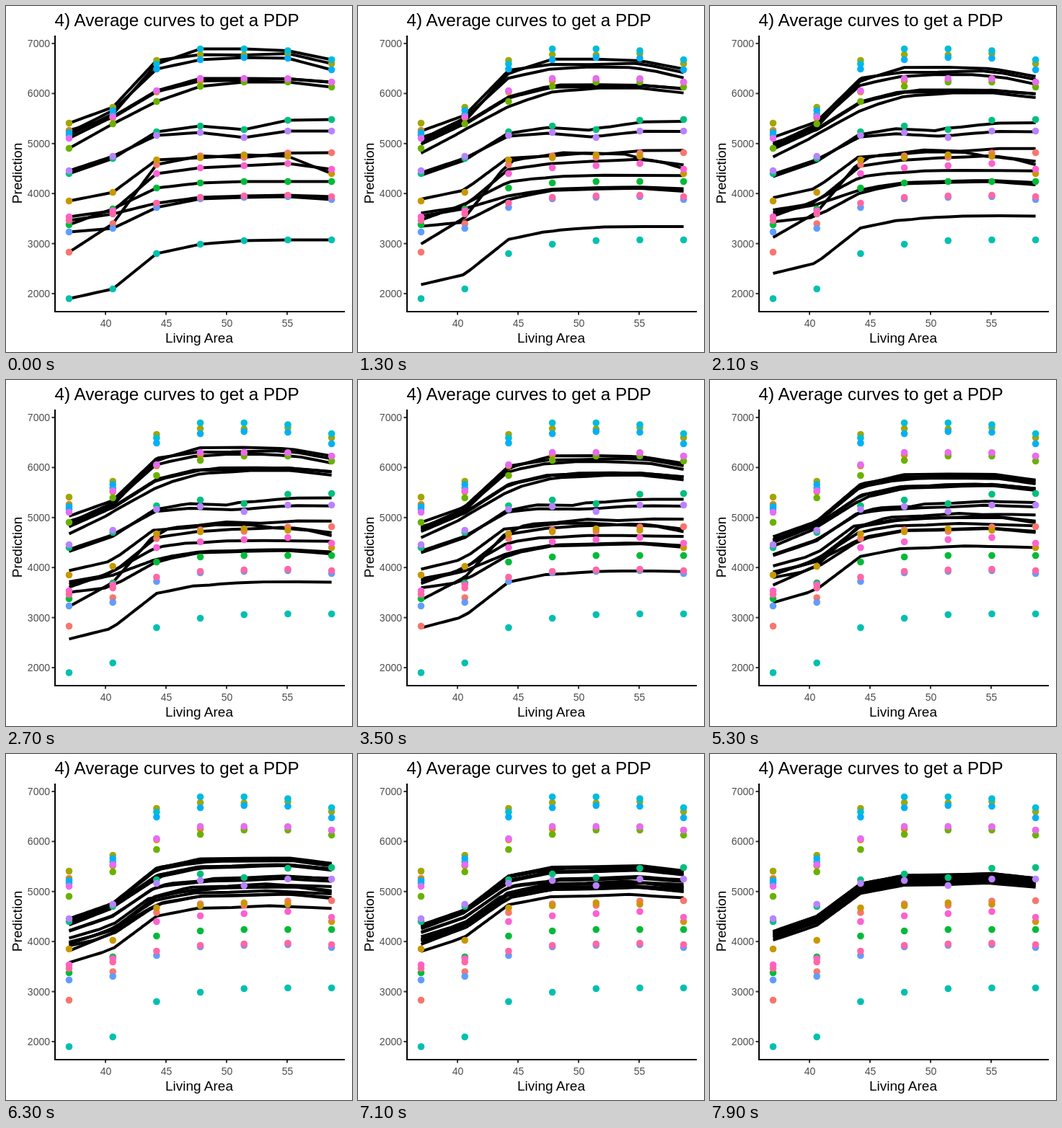
These frames come from a looping animation (480 px wide and 480 px high, 8 s). An HTML page with a canvas:

```html
<!DOCTYPE html>
<html lang="en">
<head>
<meta charset="utf-8">
<title>Average curves to get a PDP</title>
<style>
  html, body { margin: 0; width: 100%; height: 100%; overflow: hidden; background: #fff; }
  canvas, svg { position: absolute; left: 0; top: 0; width: 480px; height: 480px; }
  text { font-family: "Liberation Sans", Arial, sans-serif; }
  .title { font-size: 24.25px; }
  .name { font-size: 19px; text-anchor: middle; }
  .tick { font-size: 14px; fill: #4d4d4d; }
  .x { text-anchor: middle; }
  .y { text-anchor: end; }
</style>
</head>
<body>
<canvas id="plot" width="480" height="480"></canvas>
<svg id="axes" viewBox="0 0 480 480">
  <text class="title" x="67.5" y="28">4) Average curves to get a PDP</text>
  <text class="name" x="268" y="467">Living Area</text>
  <text class="name" transform="translate(22 232) rotate(-90)">Prediction</text>
  <path d="M68 41V424H470" fill="none" stroke="#000" stroke-width="2"/>
</svg>
<script>
const LOOP = 8000, HOLD = 500, STEP = 200, STEPS = 40, POINTS = 50;
const PX_PER_X = 16.8, PX_PER_Y = 0.0694;
const xs = [0, 1, 2, 3, 4, 5, 6].map(i => 87.5 + i * 60.7);

// colour, then the height in pixels at each x
const series = [
  ["#F8766D", 341.5, 302, 220, 208, 210, 204, 203.5],
  ["#E58700", 172.5, 155, 119, 104, 103, 101, 106],
  ["#C99800", 270.5, 258.5, 213.5, 210.5, 206.5, 208.5, 232.5],
  ["#A3A500", 162.5, 140.5, 75.5, 67.5, 68, 66, 80],
  ["#6BB100", 197.5, 163.5, 132.5, 111.5, 105.5, 105.5, 112.5],
  ["#00BA38", 303.5, 281.5, 252.5, 245.5, 243.5, 243.5, 243.5],
  ["#00BF7D", 232.5, 211.5, 174.5, 166.5, 171.5, 158.5, 157.5],
  ["#00C0AF", 406, 392.5, 343.5, 330.5, 325.5, 324.5, 324.5],
  ["#00BCD8", 179, 150, 80.5, 59.5, 59.5, 62, 74.5],
  ["#00B0F6", 175.5, 145, 87.5, 74.5, 71.5, 72.5, 88.5],
  ["#619CFF", 313.5, 308.5, 279.5, 267.5, 265.5, 264.5, 268.5],
  ["#B983FF", 228.5, 208.5, 179.5, 175.5, 182.5, 173.5, 173.5],
  ["#E76BF3", 183.5, 153.5, 117.5, 100.5, 100.5, 101, 105.5],
  ["#FD61D1", 292.5, 284, 232.5, 224.5, 221.5, 218.5, 226.5],
  ["#FF67A4", 297.5, 288.5, 273.5, 265.5, 263.5, 262.5, 264.5]
].map(([color, ...ys]) => ({ color, ys }));

const mean = xs.map((_, i) => series.reduce((sum, s) => sum + s.ys[i], 0) / series.length);

// Split the longest piece, measured in data units, until the path has enough points.
function resample(ys) {
  const lengths = ys.slice(1).map((y, i) =>
    Math.hypot((xs[i + 1] - xs[i]) / PX_PER_X, (y - ys[i]) / PX_PER_Y));
  const parts = lengths.map(() => 1);
  for (let n = ys.length; n < POINTS; n++) {
    const pieces = lengths.map((l, i) => l / parts[i]);
    parts[pieces.indexOf(Math.max(...pieces))]++;
  }
  const points = [[xs[0], ys[0]]];
  parts.forEach((count, i) => {
    for (let j = 1; j <= count; j++) {
      const f = j / count;
      points.push([mix(xs[i], xs[i + 1], f), mix(ys[i], ys[i + 1], f)]);
    }
  });
  return points;
}

function mix(a, b, t) { return a + (b - a) * t; }

const goal = resample(mean);
for (const s of series) s.path = resample(s.ys);

const svg = document.getElementById("axes");
function add(tag, attrs, text = "") {
  const el = document.createElementNS(svg.namespaceURI, tag);
  for (const key in attrs) el.setAttribute(key, attrs[key]);
  el.textContent = text;
  svg.append(el);
}
const tickLine = d => add("path", { d, stroke: "#333", "stroke-width": 2 });
for (let v = 2000; v <= 7000; v += 1000) {
  const y = 399 - (v - 2000) * PX_PER_Y;
  tickLine(`M63.5 ${y}H67`);
  add("text", { class: "tick y", x: 61, y: y + 5 }, v);
}
for (let v = 40; v <= 55; v += 5) {
  const x = 138 + (v - 40) * PX_PER_X;
  tickLine(`M${x} 425V428.5`);
  add("text", { class: "tick x", x: x + 0.5, y: 445 }, v);
}

const ctx = document.getElementById("plot").getContext("2d");
ctx.lineWidth = 4;
ctx.lineJoin = "round";

function draw(t) {
  ctx.fillStyle = "#fff";
  ctx.fillRect(0, 0, 480, 480);
  for (const { path } of series) {
    ctx.beginPath();
    path.forEach(([x, y], i) => ctx.lineTo(mix(x, goal[i][0], t), mix(y, goal[i][1], t)));
    ctx.stroke();
  }
  for (const { color, ys } of series) {
    ctx.fillStyle = color;
    ys.forEach((y, i) => {
      ctx.beginPath();
      ctx.arc(xs[i], y, 4.8, 0, 2 * Math.PI);
      ctx.fill();
    });
  }
}

function tick() {
  const time = performance.now() % LOOP;
  const step = time < HOLD ? 0 : Math.floor((time - HOLD) / STEP) + 1;
  draw(step / STEPS);
  requestAnimationFrame(tick);
}
tick();
</script>
</body>
</html>
```
